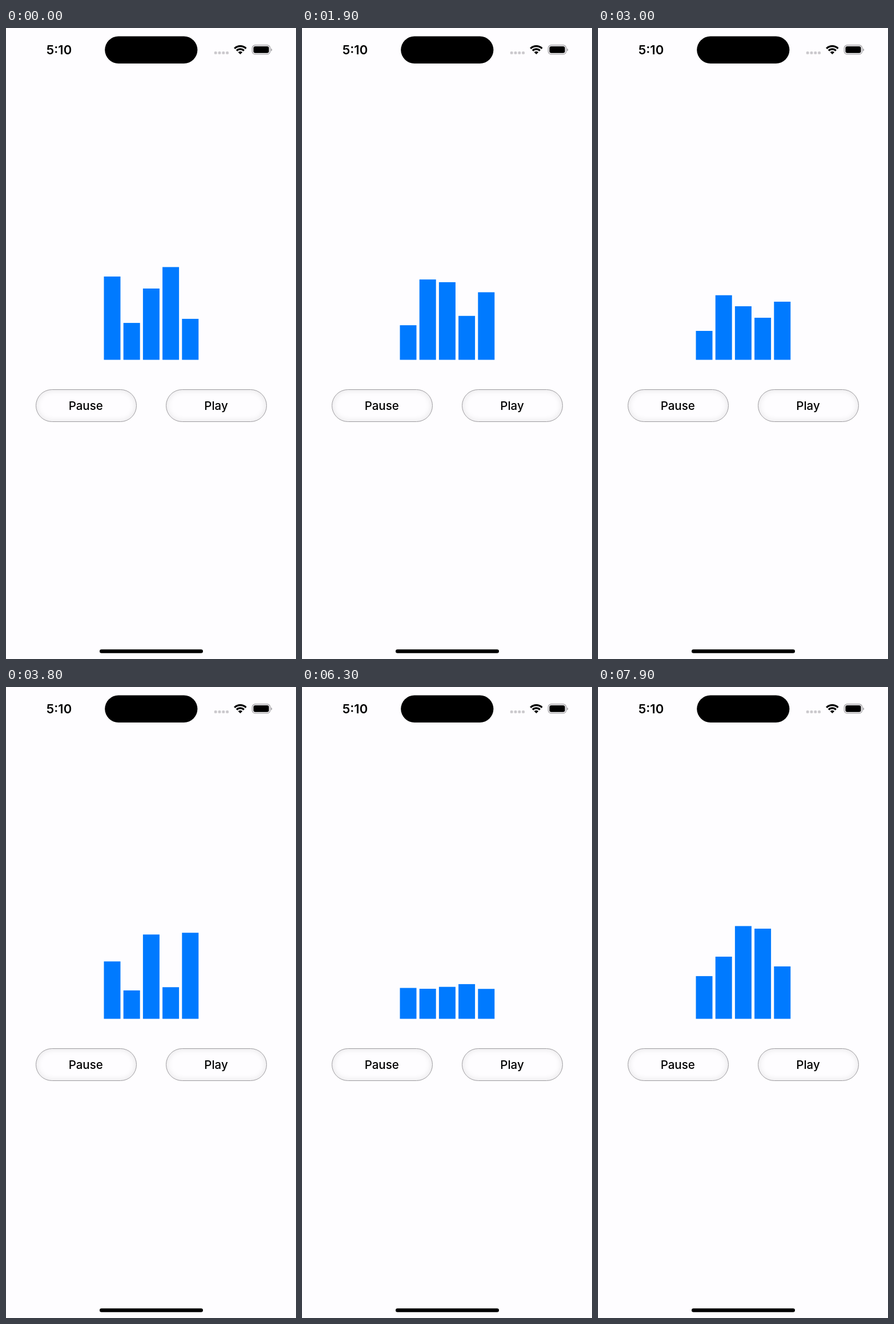
These frames come from a looping animation (508 px wide and 1102 px high, 8000 ms). An HTML page:

```html
<!DOCTYPE html>
<html lang="en">
<head>
<meta charset="utf-8">
<title>Music bars</title>
<style>
  html, body { margin: 0; width: 100%; height: 100%; overflow: hidden; background: #fefdff; }
  svg { position: absolute; left: 0; top: 0; }
  text { font: 500 20.5px Inter, sans-serif; text-anchor: middle; }
  .clock { font-size: 22px; font-weight: 600; }
  .pill {
    position: absolute; top: 631px; width: 177px; height: 57px; box-sizing: border-box;
    border: 1.2px solid #9d9b9f; border-radius: 29px;
    box-shadow: inset 0 0 12px rgba(0, 0, 0, .11);
  }
</style>
</head>
<body>
<div class="pill" style="left:51.6px"></div>
<div class="pill" style="left:280px"></div>
<svg width="508" height="1102">
  <text class="clock" x="93" y="46">5:10</text>
  <rect x="173.2" y="14.5" width="162.2" height="47.5" rx="23.75"/>
  <g fill="#cbc9cd">
    <rect x="364.8" y="41" width="4.8" height="4.8" rx="1.6"/>
    <rect x="371.6" y="41" width="4.8" height="4.8" rx="1.6"/>
    <rect x="378.4" y="41" width="4.8" height="4.8" rx="1.6"/>
    <rect x="385.2" y="41" width="4.8" height="4.8" rx="1.6"/>
  </g>
  <g transform="translate(410.4 46)">
    <path d="M-10.1-10.1A14.3 14.3 0 0 1 10.1-10.1M-6.4-6.4A9 9 0 0 1 6.4-6.4" fill="none" stroke="#000" stroke-width="3.2"/>
    <path d="M0 0L-3.8-3.8A5.4 5.4 0 0 1 3.8-3.8Z"/>
  </g>
  <rect x="431.3" y="30" width="31.4" height="15.8" rx="5" fill="none" stroke="#a3a1a5" stroke-width="1.3"/>
  <rect x="433.4" y="32.1" width="27.2" height="11.6" rx="3.3"/>
  <path d="M464.2 35.4q2 .8 2 2.7t-2 2.7z" fill="#a3a1a5"/>
  <g id="bars" fill="#007aff"></g>
  <text x="139.7" y="667">Pause</text>
  <text x="368" y="667">Play</text>
  <rect x="164" y="1085.2" width="181" height="6.6" rx="3.3"/>
</svg>
<script>
const LOOP = 8, STEP = 0.1;
const PAUSE = 4.47, REST = 4.7, RESUME = 6.2;
const BOTTOM = 579.5, LOW = 530, HIGH = 414;

// Per bar: [phase at the start of the run, half-cycles per second]
const firstRun = [[1.108, 1.654], [1.701, 1.664], [1.232, 2.07], [1.018, 1.791], [1.627, 1.919]];
const secondRun = [[0.013, 1.405], [-0.035, 1.588], [0.009, 1.77], [0.079, 1.743], [-0.032, 1.5145]];

const group = document.getElementById('bars');
const bars = firstRun.map((_, i) => {
  const bar = document.createElementNS('http://www.w3.org/2000/svg', 'rect');
  bar.setAttribute('x', 171.5 + 34.2 * i);
  bar.setAttribute('width', 29);
  return group.appendChild(bar);
});

// cubic-bezier(.42, 0, 1, 1)
function easeIn(p) {
  let lo = 0, hi = 1;
  for (let i = 0; i < 20; i++) {
    const s = (lo + hi) / 2;
    if (1.26 * s + 0.48 * s * s - 0.74 * s ** 3 < p) lo = s; else hi = s;
  }
  return lo * lo * (3 - 2 * lo);
}

const swing = ([phase, speed], t) => {
  const p = phase + speed * t;
  return easeIn(Math.abs(p - 2 * Math.round(p / 2)));
};

function level(i, t) {
  if (t > RESUME + STEP / 2) return swing(secondRun[i], t - RESUME);
  if (t > REST - STEP / 2) return 0;
  const decay = Math.min(1, (REST - t) / (REST - PAUSE));
  return swing(firstRun[i], t) * decay;
}

function draw(now) {
  const t = Math.floor((now / 1000 % LOOP) / STEP + 1e-6) * STEP;
  bars.forEach((bar, i) => {
    const top = LOW + (HIGH - LOW) * level(i, t);
    bar.setAttribute('y', top);
    bar.setAttribute('height', BOTTOM - top);
  });
}

const start = performance.now();
function tick() {
  draw(performance.now() - start);
  requestAnimationFrame(tick);
}
tick();
</script>
</body>
</html>
```
